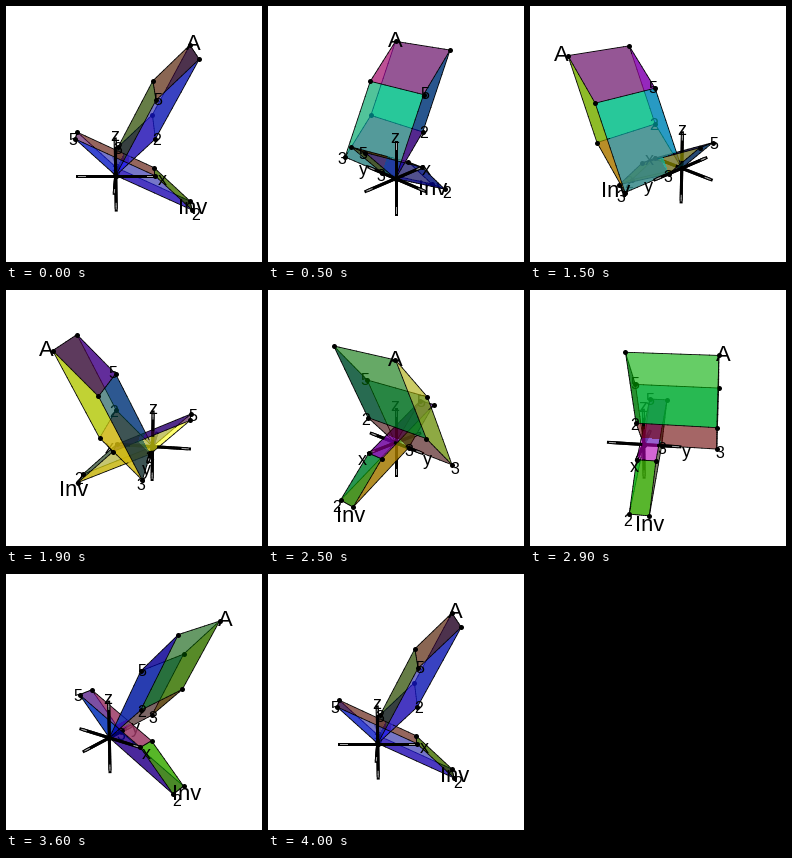
Animation of 256 by 256 pixels, one loop 4100 ms. Source, as a matplotlib script:

```python
from collections import defaultdict
import numpy as np
import matplotlib.pyplot as plt
from matplotlib.animation import FuncAnimation
from matplotlib.collections import LineCollection

SIZE, DPI = 256, 100
FRAMES, INTERVAL = 41, 100
PX = 72 / DPI                       # points per pixel

SCALE, DISTANCE = 38.7, 12.4        # pixels per unit, camera distance
MIDDLE = np.array([127.5, 128.6])
TILT = np.radians(20)
CENTER = np.array([0.455, 0.455, 0.95])
OPACITY = 0.6
BIAS = 0.004                        # lifts lines, dots and text off the faces
TOP = 100

# Rows are the three edge vectors of each box.
MATRIX = np.array([[1, 0, 1], [0, 2, 0], [1, 0, 2]], float)
INVERSE = np.linalg.inv(MATRIX)

# Face spanned by edges i, j: colour at the origin and on the far side.
FACES = [
    (0, 1, 2, (1, 0, 0), (1, 0, 1)),
    (1, 2, 0, (0, 1, 1), (0, 1, 0)),
    (0, 2, 1, (0, 0, 1), (1, 1, 0)),
]

grid = np.arange(SIZE) + 0.5
PIXEL_X, PIXEL_Y = np.meshgrid(grid, grid)


class Camera:
    def __init__(self, angle):
        c, s = np.cos(angle), np.sin(angle)
        ct, st = np.cos(TILT), np.sin(TILT)
        self.right = np.array([c, -s, 0])
        front = np.array([-s, -c, 0])
        up = np.array([0, 0, 1])
        self.up = ct * up - st * front
        self.toward = ct * front + st * up
        self.eye = CENTER + DISTANCE * self.toward
        x = (PIXEL_X - MIDDLE[0]) / SCALE
        y = (MIDDLE[1] - PIXEL_Y) / SCALE
        self.rays = (x[..., None] * self.right + y[..., None] * self.up
                     - DISTANCE * self.toward)

    def depth(self, point):
        return 1 - (point - CENTER) @ self.toward / DISTANCE

    def project(self, point):
        rel = point - CENTER
        k = SCALE / self.depth(point)
        return MIDDLE + k * np.array([rel @ self.right, -rel @ self.up])


class Face:
    def __init__(self, origin, a, b, color):
        self.origin, self.color = origin, np.array(color)
        self.center = origin + (a + b) / 2
        n = np.cross(a, b)
        self.normal = n / np.linalg.norm(n)
        self.to_sides = np.linalg.pinv(np.array([a, b]))

    def trace(self, cam):
        """Depth of the face at each pixel, infinite outside it."""
        with np.errstate(all="ignore"):
            t = (self.normal @ (self.origin - cam.eye)
                 / (cam.rays @ self.normal))
            sides = (t[..., None] * (cam.rays @ self.to_sides)
                     + (cam.eye - self.origin) @ self.to_sides)
            inside = ((sides >= 0) & (sides <= 1)).all(axis=-1)
        return np.where(inside, t, np.inf)

    def shade(self, cam):
        facing = abs(self.normal @ cam.toward)
        lit = self.color * facing + 0.7 * facing ** 30
        return (*np.minimum(lit, 1), OPACITY)


class Box:
    def __init__(self, edges, name):
        self.edges, self.name = edges, name
        bits = np.array([(i, j, k) for i in (0, 1) for j in (0, 1)
                         for k in (0, 1)])
        self.corners = bits @ edges
        self.tip = max(self.corners, key=np.linalg.norm)
        self.lines = [(corner, corner + edge)
                      for bit, corner in zip(bits, self.corners)
                      for used, edge in zip(bit, edges) if not used]
        self.faces = []
        for i, j, k, near, far in FACES:
            self.faces.append(Face(np.zeros(3), edges[i], edges[j], near))
            self.faces.append(Face(edges[k], edges[i], edges[j], far))


BOXES = [Box(MATRIX, "A"), Box(INVERSE, "Inv")]

fig = plt.figure(figsize=(SIZE / DPI, SIZE / DPI), dpi=DPI, facecolor="white")
ax = fig.add_axes([0, 0, 1, 1])


class Scene:
    def __init__(self, cam):
        self.cam = cam
        self.depths = []
        self.lines = defaultdict(list)

    def draw_faces(self):
        """Paint faces by distance of their centres, with a depth test."""
        faces = [face for box in BOXES for face in box.faces]
        faces.sort(key=lambda face: face.center @ self.cam.toward)
        nearest = np.full((SIZE, SIZE), np.inf)
        for rank, face in enumerate(faces):
            t = face.trace(self.cam)
            seen = (t <= nearest + 1e-6) & np.isfinite(t)
            nearest[seen] = t[seen]
            self.depths.append(np.where(seen, t, np.inf))
            image = np.zeros((SIZE, SIZE, 4))
            image[seen] = face.shade(self.cam)
            ax.imshow(image, extent=(0, SIZE, SIZE, 0), aspect="auto",
                      interpolation="nearest", zorder=rank + 1)

    def level(self, point):
        """Just below the first painted face that hides the point."""
        col, row = np.clip(self.cam.project(point).astype(int), 0, SIZE - 1)
        limit = self.cam.depth(point) - BIAS
        for rank, t in enumerate(self.depths):
            if t[row, col] < limit:
                return rank
        return TOP

    def add_line(self, p, q, pieces, width, color, lift=0):
        stops = [p + (q - p) * f for f in np.linspace(0, 1, pieces + 1)]
        for a, b in zip(stops[:-1], stops[1:]):
            style = (self.level((a + b) / 2) + lift, width, color)
            self.lines[style].append([self.cam.project(a),
                                      self.cam.project(b)])

    def draw_lines(self):
        for (z, width, color), parts in self.lines.items():
            ax.add_collection(LineCollection(
                parts, colors=color, linewidths=width * PX,
                capstyle="projecting", zorder=z), autolim=False)

    def draw_dot(self, point):
        x, y = self.cam.project(point)
        ax.plot(x, y, "o", color="black", markersize=5 * PX,
                markeredgewidth=0, zorder=self.level(point) + 0.4)

    def draw_label(self, text, point, size):
        x, y = self.cam.project(point)
        ax.text(x - 0.5, y + 0.52 * size, text, fontsize=size * PX,
                color="black", family="Liberation Sans", ha="center",
                va="baseline", zorder=self.level(point) + 0.5)

    def draw_axes(self):
        for direction, name in zip(np.eye(3), "xyz"):
            self.add_line(-direction, direction, 24, 3, "black", 0.2)
            for sign in (-1, 1):
                end = sign * direction
                self.add_line(0.8 * end, 0.97 * end, 2, 1, "0.65", 0.3)
            self.draw_label(name, 1.2 * direction, 18)

    def draw_box(self, box):
        for p, q in box.lines:
            self.add_line(p, q, 10, 0.8, "black", 0.1)
        for corner in box.corners:
            self.draw_dot(corner)
        for edge, digit in zip(box.edges, "235"):
            self.draw_label(digit, 1.05 * edge, 16)
        self.draw_label(box.name, 1.05 * box.tip, 22)


def update(frame):
    ax.clear()
    scene = Scene(Camera(2 * np.pi * frame / (FRAMES - 1)))
    scene.draw_faces()
    scene.draw_axes()
    for box in BOXES:
        scene.draw_box(box)
    scene.draw_lines()
    ax.set_xlim(0, SIZE)
    ax.set_ylim(SIZE, 0)
    ax.axis("off")
    return []


anim = FuncAnimation(fig, update, frames=FRAMES, interval=INTERVAL,
                     init_func=lambda: [], repeat=True, repeat_delay=0)
plt.show()
```
